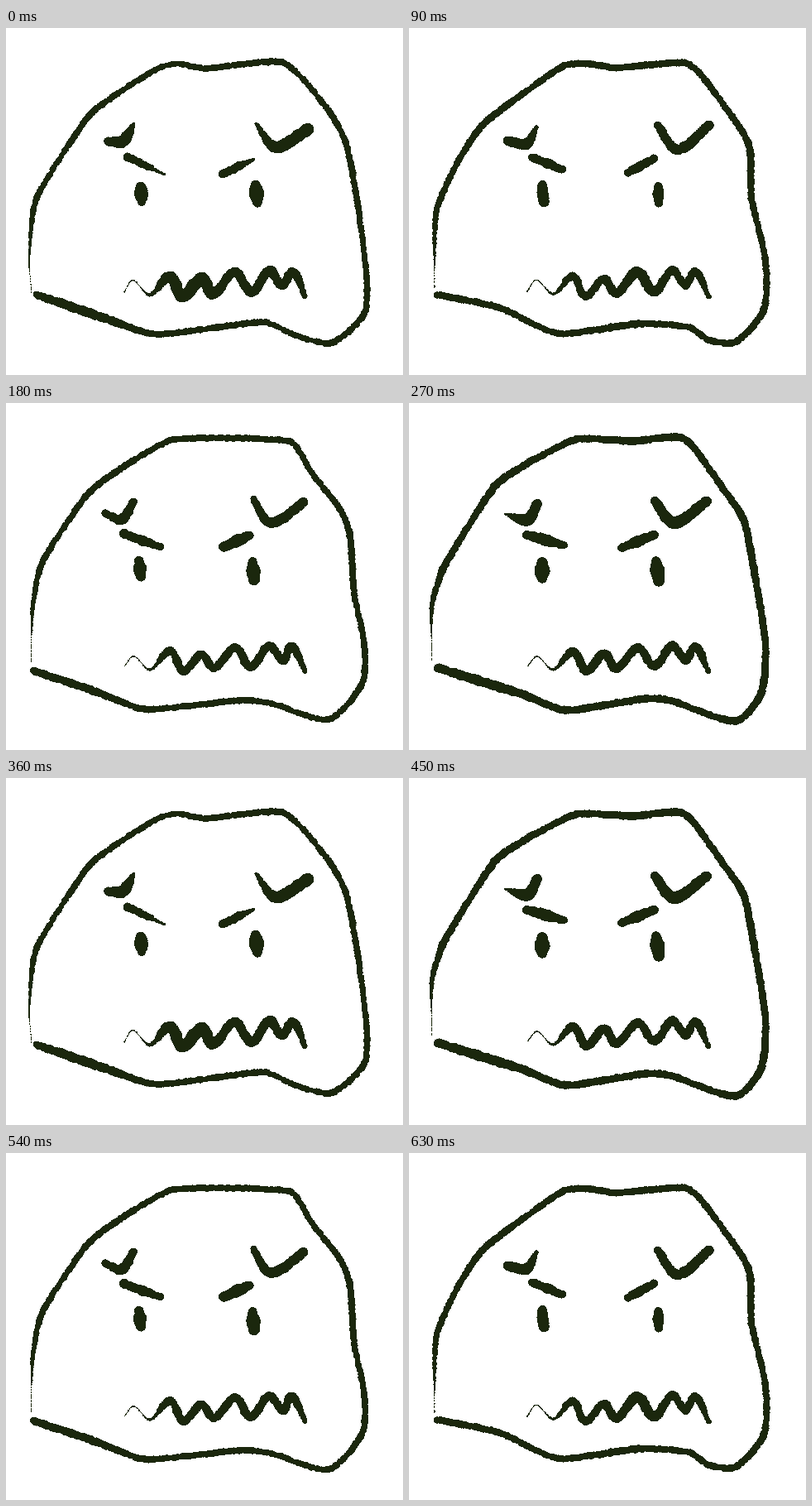
An HTML page for the animation above (0.72 s loop, 480 by 419 pixels).

```html
<!DOCTYPE html>
<html lang="en">
<head>
<meta charset="utf-8">
<title>Grumpy blob</title>
<style>
html, body { margin: 0; width: 100%; height: 100%; overflow: hidden; background: #fff; }
svg { display: block; width: 100%; height: 100%; }
</style>
</head>
<body>
<svg viewBox="0 0 480 419"><path id="face" fill="#1b270d" shape-rendering="crispEdges"/></svg>
<script>
const STEP = 90;

let seed = 7;
const rand = () => (seed = seed * 16807 % 2147483647) / 2147483647;
const jitter = size => (rand() - 0.5) * size;
const ease = t => { t = Math.min(1, Math.max(0, t)); return t * t * (3 - 2 * t); };
const bump = (t, centre, spread) => Math.exp(-(((t - centre) / spread) ** 2));

const dot = (x, y, r) => {
  const d = (2 * r).toFixed(2), a = r.toFixed(2);
  return `M${(x - r).toFixed(2)} ${y.toFixed(2)}a${a} ${a} 0 1 1 ${d} 0a${a} ${a} 0 1 1 -${d} 0z`;
};

// Unit direction through point i, taken from its neighbours.
function heading(pts, i) {
  const a = pts[Math.max(i - 1, 0)], b = pts[Math.min(i + 1, pts.length - 1)];
  const dx = b[0] - a[0], dy = b[1] - a[1], len = Math.hypot(dx, dy);
  return [dx / len, dy / len];
}

// A rough brush line through x, y pairs; width(t) runs along its length.
function brush(coords, width) {
  const pts = [];
  for (let i = 0; i < coords.length; i += 2) pts.push([coords[i], coords[i + 1]]);
  const lens = pts.slice(1).map((p, i) => Math.hypot(p[0] - pts[i][0], p[1] - pts[i][1]));
  const total = lens.reduce((a, b) => a + b);
  let path = "", done = 0;
  lens.forEach((len, i) => {
    const [x0, y0] = pts[i], [x1, y1] = pts[i + 1];
    const m0 = heading(pts, i), m1 = heading(pts, i + 1);
    const n = Math.ceil(len / 1.3), bend = Math.min(len, 70) * 0.7;
    for (let k = 0; k <= n; k++) {
      const t = k / n, s = ease(t);
      const h0 = t * (1 - t) ** 2 * bend, h1 = t * t * (t - 1) * bend;
      const w = width((done + s * len) / total), rough = Math.min(1, w / 6);
      const x = x0 + (x1 - x0) * s + m0[0] * h0 + m1[0] * h1 + jitter(rough);
      const y = y0 + (y1 - y0) * s + m0[1] * h0 + m1[1] * h1 + jitter(rough);
      path += dot(x, y, Math.max(0.6, w / 2 + jitter(1.5 * rough)));
    }
    done += len;
  });
  return path;
}

// Three widths: at the start, in the middle and at the end.
const stroke = (coords, a, b, c) =>
  brush(coords, t => t < 0.5 ? a + (b - a) * 2 * t : b + (c - b) * (2 * t - 1));

// Starts as a hairline; heel is the extra weight near the finish.
const outline = (weight, heel, coords) => brush(coords, t =>
  weight * ease(t / 0.1) + heel * bump(t, 0.95, 0.05) + 0.5 * Math.sin(40 * t));

const ZIGZAG = [143, 318, 154, 305, 174, 322, 198, 300, 214, 324, 236, 303, 251, 321,
  277, 295, 296, 319, 319, 293, 334, 311, 346, 294, 362, 324];

const mouth = (weight, bulge = 0, at = 0) => brush(ZIGZAG.map(v => v + jitter(2)), t =>
  1.5 + (weight - 1.5) * ease((t - 0.08) / 0.16) * (1 - 0.5 * ease((t - 0.92) / 0.08))
  + bulge * bump(t, at, 0.13));

// Each drawing: outline, then left mark, brow, eye, the same on the right, and mouth.
const heavy = [
  outline(6.8, 4, [31, 320, 28, 280, 37, 205, 102, 104, 176, 53, 204, 43, 240, 49, 335, 42,
    391, 101, 411, 139, 424, 205, 436, 300, 433, 345, 394, 380, 352, 372, 311, 355,
    183, 370, 115, 349, 37, 322]),
  stroke([124, 137, 141, 137, 155, 115], 11, 14, 4),
  stroke([147, 156, 192, 177], 9, 8, 3),
  stroke([163, 191, 164, 210], 12, 17, 11),
  stroke([302, 115, 326, 144, 365, 122], 4, 14, 14),
  stroke([262, 176, 299, 159], 9, 10, 4),
  stroke([302, 190, 304, 211], 12, 18, 11),
  mouth(10.5, 4, 0.36)
];
const narrow = [
  outline(7.5, 0, [31, 320, 31, 250, 34, 217, 60, 160, 92, 114, 186, 46, 215, 43, 250, 48,
    333, 42, 352, 55, 410, 138, 414, 205, 431, 280, 429, 340, 395, 379, 363, 377, 340, 362,
    280, 357, 180, 369, 110, 338, 34, 322]),
  stroke([119, 136, 142, 140, 154, 120], 11, 12, 5),
  stroke([149, 156, 185, 171], 10, 11, 9),
  stroke([161, 188, 163, 211], 10, 14, 12),
  stroke([301, 118, 325, 147, 363, 117], 10, 12, 11),
  stroke([264, 175, 296, 158], 9, 11, 9),
  stroke([301, 191, 302, 212], 10, 13, 10),
  mouth(9, 3, 0.58)
];
const round = [
  outline(7, 2, [30, 314, 33, 240, 45, 190, 97, 112, 130, 85, 203, 44, 342, 46, 370, 85,
    405, 130, 416, 160, 421, 230, 433, 290, 431, 338, 390, 382, 325, 364, 285, 359,
    170, 370, 110, 349, 32, 323]),
  stroke([120, 133, 140, 141, 154, 119], 9, 12, 9),
  stroke([143, 158, 187, 174], 10, 12, 7),
  stroke([161, 191, 163, 209], 11, 15, 12),
  stroke([299, 116, 320, 145, 360, 120], 8, 12, 11),
  stroke([263, 174, 295, 160], 11, 15, 10),
  stroke([298, 190, 300, 214], 9, 17, 13),
  mouth(9.5)
];
const bold = [
  outline(8.2, 3, [28, 312, 28, 243, 43, 197, 107, 97, 198, 45, 270, 46, 326, 41, 342, 51,
    378, 101, 404, 140, 416, 195, 431, 290, 426, 350, 395, 384, 315, 359, 285, 357,
    190, 371, 135, 351, 35, 320]),
  stroke([116, 134, 144, 141, 155, 121], 3, 14, 11),
  stroke([142, 159, 188, 172], 10, 14, 9),
  stroke([161, 193, 161, 212], 13, 18, 13),
  stroke([297, 118, 321, 145, 360, 118], 11, 14, 12),
  stroke([257, 175, 297, 159], 9, 13, 10),
  stroke([299, 191, 302, 215], 12, 19, 13),
  mouth(10)
];

const cycle = [heavy, narrow, round, bold, heavy, bold, round, narrow].map(p => p.join(""));
const face = document.getElementById("face");
let shown = -1;

function render(ms) {
  const next = Math.floor(ms / STEP) % cycle.length;
  if (next !== shown) face.setAttribute("d", cycle[shown = next]);
}

const start = performance.now();
function tick() {
  render(performance.now() - start);
  requestAnimationFrame(tick);
}
tick();
</script>
</body>
</html>
```
